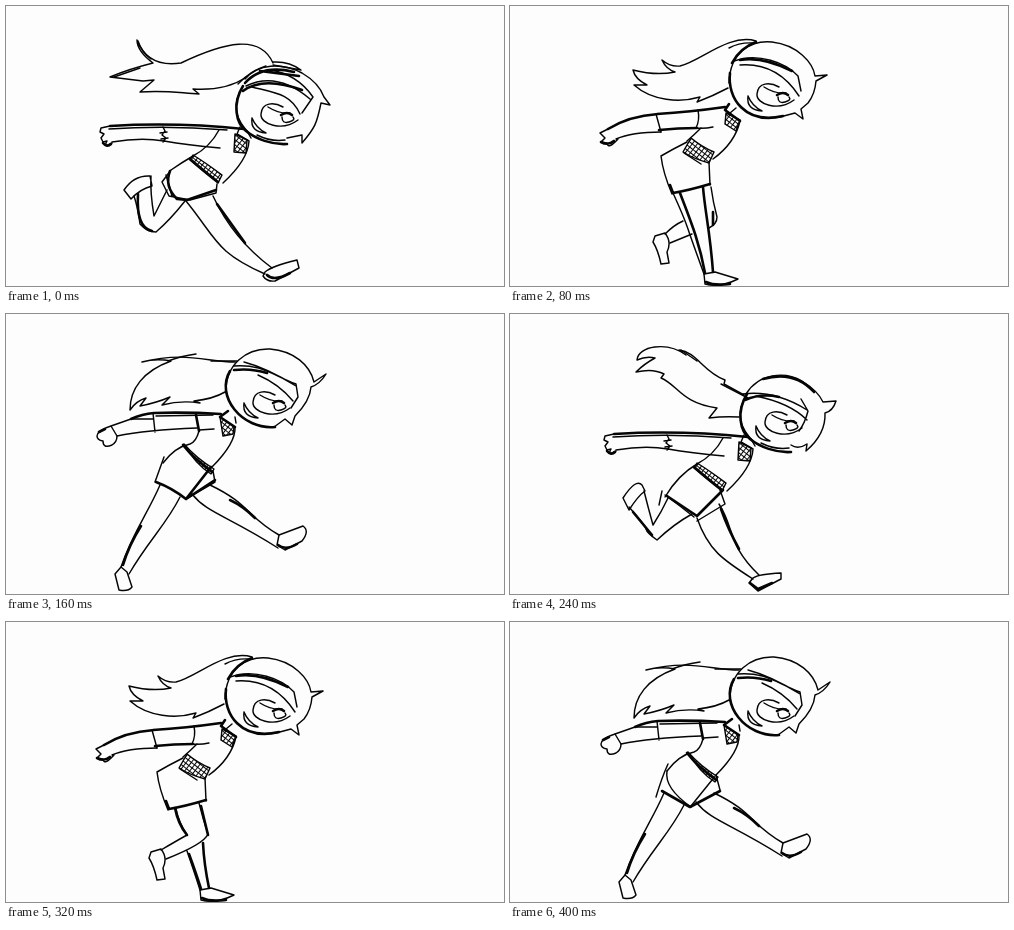
These frames come from a looping animation (498 px wide and 280 px high, 480 ms). An HTML page:

```html
<!DOCTYPE html>
<html lang="en">
<head>
<meta charset="utf-8">
<title>Running girl sketch</title>
<style>
html, body { margin: 0; width: 100%; height: 100%; overflow: hidden; background: #fdfdfd; }
svg { display: block; width: 100vw; height: 100vh; }
path { fill: none; stroke: #050505; stroke-width: 1.45; stroke-linecap: round; stroke-linejoin: round; }
.bold { stroke-width: 2.6; }
.hatch { fill: url(#mesh); }
.pose, .part { visibility: hidden; animation-delay: calc(var(--slot) * 80ms - 480ms); }
.pose { animation-name: pose; animation-duration: 240ms; }
.part { animation-name: part; animation-duration: 480ms; }
.pose, .part { animation-timing-function: step-end; animation-iteration-count: infinite; }
@keyframes pose { 0% { visibility: visible; } 33.333%, 100% { visibility: hidden; } }
@keyframes part { 0% { visibility: visible; } 16.666%, 100% { visibility: hidden; } }
</style>
</head>
<body>
<svg viewBox="0 0 498 280">
  <defs>
    <pattern id="mesh" width="4" height="4" patternUnits="userSpaceOnUse" patternTransform="rotate(38)">
      <path d="M0 0H4M0 0V4" style="stroke-width:2"/>
    </pattern>
    <g id="eye">
      <path d="M284 94C268 106 246 98 247 88C248 76 260 76 269 81M254 81Q265 88 276 87"/>
      <path d="M268 91Q268 98 275 96T279 91"/>
      <path class="bold" d="M267 89Q273 85 278 89"/>
    </g>
    <path id="mouth" d="M238 90Q236 104 252 105Q242 100 238 90"/>
  </defs>

  <!-- Reaching pose -->
  <g class="pose" style="--slot:0">
    <path class="bold" d="M237 80C226 98 230 117 240 125S266 139 281 138"/>
    <path d="M233 88Q224 108 243 127M251 129Q265 136 279 134"/>
    <use href="#eye" x="8" y="20"/>
    <use href="#mouth" x="8" y="22"/>
    <!-- arm -->
    <path class="bold" d="M104 120Q170 116 238 123M97 137Q101 142 105 138"/>
    <path d="M103 123Q160 119 221 124M104 120L95 122L94 126L98 128L95 132L97 136L101 135Q97 142 106 137"/>
    <path d="M106 136Q135 131 158 135T214 142M157 121L159 125L156 129L160 132L157 136M154 127L161 126M155 133L162 132"/>
    <!-- body -->
    <path d="M234 121L231 128L243 135Q242 154 217 177M241 125L245 132M213 124Q204 141 187 150"/>
    <path class="hatch" d="M229 128L241 134L240 147L228 146Z"/>
    <path class="hatch" d="M187 149Q200 157 216 169L212 177Q199 167 184 154Z"/>
    <path class="bold" d="M184 153Q198 165 212 176"/>
  </g>

  <!-- Leaning pose -->
  <g class="pose" style="--slot:1">
    <path class="bold" d="M220 67C217 92 235 119 273 110M222 57Q230 42 246 36"/>
    <path d="M219 77C220 45 242 34 262 36C288 39 303 57 305 70L317 69L306 75Q305 88 298 97L291 103L293 113L285 107L270 111"/>
    <path d="M224 55C248 46 276 57 288 70L291 85M230 59C257 57 276 70 289 90"/>
    <path class="bold" d="M230 54Q252 50 282 65"/>
    <use href="#eye"/>
    <use href="#mouth"/>
    <!-- hair -->
    <path d="M246 35C219 27 191 55 170 60Q160 61 152 54Q156 63 165 66Q146 70 123 64Q125 73 137 79L124 79C142 95 170 97 190 91L187 96Q203 90 218 82"/>
    <path d="M219 42Q230 36 244 37"/>
    <!-- arm -->
    <path class="bold" d="M98 123Q119 110 148 108M147 108Q180 106 215 101M91 136Q98 140 104 135M149 124Q168 122 187 122"/>
    <path d="M98 123L90 127L95 132L91 136L97 137Q98 144 108 133M106 133Q122 126 151 126"/>
    <path d="M146 108L151 126M188 104Q190 114 186 122Q194 123 203 121"/>
    <!-- body -->
    <path class="bold" d="M219 98L215 104L230 115M160 179L163 187Q180 184 200 178"/>
    <path d="M226 102L220 107M230 115Q225 137 203 153M191 122Q185 128 177 135"/>
    <path d="M177 136Q163 143 151 150Q153 167 162 188M199 156L200 179M174 147L191 158"/>
    <path class="hatch" d="M216 107L230 114L226 125L215 118Z"/>
    <path class="hatch" d="M181 132Q192 141 204 146L199 157Q184 153 173 146Z"/>
    <!-- feet -->
    <path d="M194 268L195 278Q210 282 228 273L205 266ZM145 230L155 227Q162 236 157 246L159 257L151 258Q148 244 143 236Z"/>
    <path class="bold" d="M196 276Q204 280 220 278"/>
  </g>

  <!-- Striding pose -->
  <g class="pose" style="--slot:2">
    <path class="bold" d="M224 57C209 82 236 116 269 113M228 56Q245 54 261 59"/>
    <path d="M220 79C219 50 241 34 264 35C288 37 304 51 308 68L320 60Q314 70 305 73Q304 87 289 102L286 111L279 105L268 113"/>
    <path d="M228 52C256 50 266 61 290 70L292 83L285 94M238 48Q261 54 290 72M252 61Q273 70 287 87"/>
    <use href="#eye"/>
    <use href="#mouth" y="-1"/>
    <!-- hair -->
    <path d="M229 48C201 48 180 37 136 48Q150 44 165 47C137 57 124 75 124 96Q130 87 140 84L134 92Q150 89 164 83L156 91Q175 86 194 89L188 87Q207 85 219 78"/>
    <path d="M190 40Q175 42 162 47M205 47L231 47"/>
    <!-- arm -->
    <path class="bold" d="M125 105Q136 100 148 99Q180 98 215 100M93 118L99 115M190 101L193 117"/>
    <path d="M150 102L207 101M125 105L105 112Q92 116 91 122Q91 126 97 127Q97 135 106 131Q111 128 111 122"/>
    <path d="M105 112L111 122Q140 116 191 114M147 99L149 118M127 105L147 105M193 116L208 115"/>
    <!-- body -->
    <path class="bold" d="M222 97L214 103L229 113M177 131Q188 145 206 158"/>
    <path d="M229 103L230 109M229 113Q230 129 206 153M193 117Q190 128 184 130Q169 133 157 149"/>
    <path class="hatch" d="M214 103L228 113L227 120L217 122Z"/>
    <path class="hatch" d="M178 130Q190 144 208 155L205 160Q189 150 178 130Z"/>
    <!-- legs -->
    <path d="M154 171C142 199 127 218 115 253M174 183C160 211 142 227 123 260"/>
    <path class="bold" d="M135 212Q123 231 117 251M224 186Q237 192 249 204M272 231Q279 237 291 230"/>
    <path d="M115 253L109 260L113 276Q122 278 126 273L121 258ZM186 180C201 199 220 201 272 234M204 171C244 190 240 202 273 221"/>
    <path d="M273 221L297 212Q304 217 296 227L279 236L271 231Z"/>
  </g>

  <!-- Swept hair, wide run -->
  <g class="part" style="--slot:0">
    <path d="M239 73C252 58 275 56 296 67Q313 77 318 91L324 99L315 97C311 117 309 122 296 137V129L281 132"/>
    <path class="bold" d="M239 77Q256 58 288 66M237 85Q257 70 296 84M254 65L293 70"/>
    <path d="M240 80Q271 65 304 93M246 81C270 87 285 88 294 108M264 64Q291 68 307 91L296 107"/>
    <path d="M232 78Q244 65 260 60M267 56Q283 55 295 64L267 59"/>
    <path d="M267 57C254 28 219 36 175 57Q142 62 131 34Q131 45 147 57Q123 63 104 71L137 75L148 74L134 86C160 84 174 87 193 88L187 83Q219 85 239 72"/>
    <path d="M132 35Q136 47 145 53M108 71L134 62"/>
    <!-- shorts -->
    <path d="M187 150Q175 157 165 164L156 176L163 190L184 194L210 187L211 178M160 169L166 190"/>
    <path class="bold" d="M164 165Q158 180 171 193L181 194L210 184"/>
    <!-- legs -->
    <path d="M180 195C211 233 209 246 259 268M207 190Q227 233 266 262"/>
    <path class="bold" d="M211 198L239 237M261 269Q268 276 284 267M132 188Q130 222 146 225"/>
    <path d="M259 266Q266 260 291 254L293 262L269 275Q261 276 257 270Z"/>
    <path d="M118 184Q128 169 144 170L146 180Q134 183 125 193ZM145 170Q144 186 148 210L161 184"/>
    <path d="M128 190Q132 202 134 218Q141 226 150 226Q164 214 179 195"/>
  </g>

  <!-- Supporting leg in front -->
  <g class="part" style="--slot:1">
    <path d="M163 187Q174 211 178 223T194 268M201 181Q203 196 207 211Q207 218 199 222"/>
    <path class="bold" d="M170 187C179 211 189 234 195 267M193 181C195 206 200 225 203 266M203 206V219"/>
    <path d="M155 228Q164 219 173 215M160 237L182 228"/>
  </g>

  <!-- Square shorts -->
  <g class="part" style="--slot:2">
    <path d="M158 143Q154 154 149 168M180 185L209 168L207 157"/>
    <path class="bold" d="M150 168Q166 174 180 185L209 166M205 153L180 185"/>
  </g>

  <!-- Tufted hair, short run -->
  <g class="part" style="--slot:3">
    <path d="M236 80C249 59 275 57 292 67Q308 77 313 88L326 87Q323 97 315 99Q316 120 296 137L297 130Q288 136 281 131"/>
    <path class="bold" d="M253 65Q284 56 304 78M235 86Q251 79 269 83"/>
    <path d="M233 80Q265 76 297 96M246 82Q280 89 297 106M291 85L298 97Q295 109 289 117"/>
    <!-- hair -->
    <path d="M234 81L214 70L215 66C193 58 187 38 169 36L176 41C157 27 128 32 127 46Q136 42 145 44Q134 50 126 58Q143 54 154 60L151 64C168 71 171 89 207 94L199 104Q214 102 229 103"/>
    <path d="M171 36L187 47M211 70L238 84"/>
    <!-- shorts -->
    <path d="M187 150Q168 161 155 183M155 181Q169 191 184 203M187 207L215 190L210 176M152 177L149 191"/>
    <path class="bold" d="M157 182L187 202L213 176"/>
    <!-- legs -->
    <path d="M187 204C198 236 213 246 243 265M209 190C225 215 217 230 249 261"/>
    <path class="bold" d="M211 195Q218 215 229 235M240 269L248 275L262 269M123 198L142 221"/>
    <path d="M243 264Q249 260 271 259L271 265L248 277L239 269Z"/>
    <path d="M113 184Q126 164 132 171L135 177Q128 182 119 196ZM134 177Q138 193 143 211Q152 197 158 184"/>
    <path d="M119 193Q135 211 136 215T147 226Q164 210 182 200"/>
  </g>

  <!-- Lifted leg in front -->
  <g class="part" style="--slot:4">
    <path d="M170 187Q173 201 181 213Q172 218 155 228M193 181Q197 197 202 212Q198 222 160 237M181 229Q189 252 194 268"/>
    <path class="bold" d="M169 186Q172 202 181 213M195 184L202 213M183 232Q190 251 195 267M197 221Q198 242 203 266"/>
  </g>

  <!-- Rounded shorts -->
  <g class="part" style="--slot:5">
    <path d="M158 142Q152 155 146 175M157 149Q154 166 181 185M206 153L210 168M202 158L181 184"/>
    <path class="bold" d="M152 169Q166 177 180 185L210 169"/>
  </g>
</svg>
</body>
</html>
```
